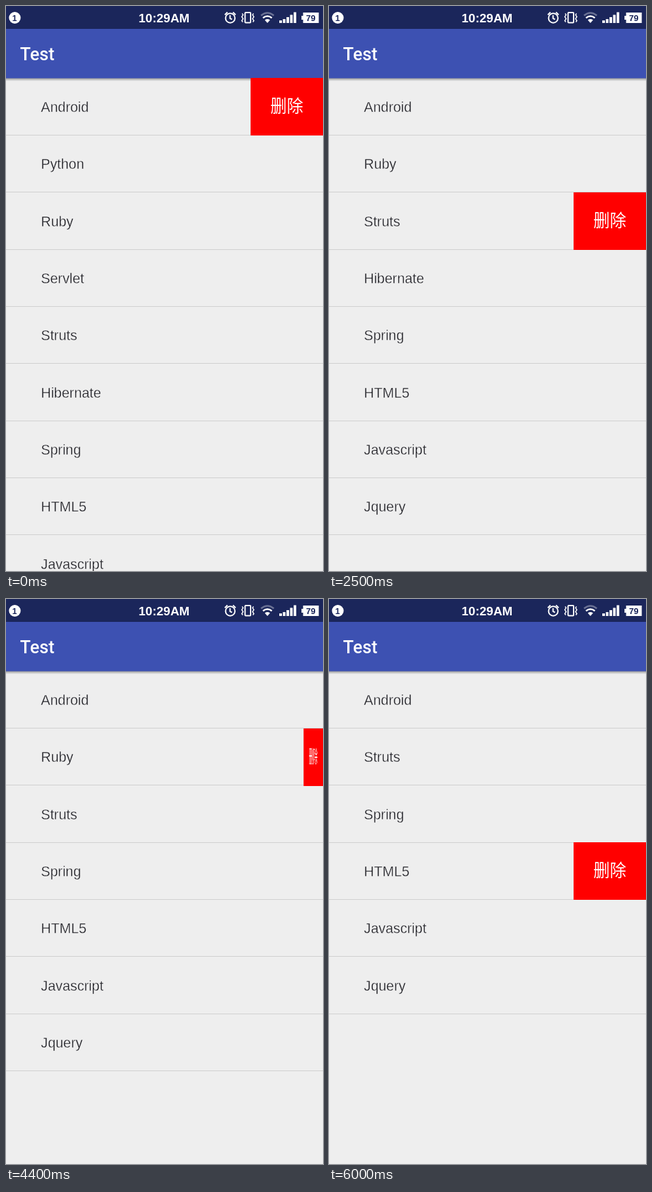
An HTML page that plays this animation: 486 px wide and 864 px high, repeating every 6100 ms.

```html
<!DOCTYPE html>
<html lang="zh-CN">
<head>
<meta charset="utf-8">
<title>Test</title>
<style>
  html, body { margin: 0; width: 100%; height: 100%; overflow: hidden; background: #eee; }
  svg { display: block; width: 486px; height: 864px; }
  .row text { font: 21.3px "Liberation Sans", sans-serif; fill: #1c1c22; stroke: #eee; stroke-width: .4px; }
  .status { font: bold 19px "Liberation Sans", sans-serif; fill: #fff; }
  .small { font: bold 13px "Liberation Sans", sans-serif; fill: #1b265b; text-anchor: middle; }
  .title { font: 500 27px Roboto, sans-serif; fill: #fff; }
  .delete { font: 500 27px "Noto Sans CJK SC", "Noto Sans CJK", sans-serif; fill: #fff; text-anchor: middle; }
  .line { fill: none; stroke: #fff; stroke-width: 2; }
</style>
</head>
<body>
<svg viewBox="0 0 486 864">
  <defs>
    <linearGradient id="shade" x2="0" y2="1">
      <stop stop-color="#000" stop-opacity=".38"/>
      <stop offset="1" stop-color="#000" stop-opacity="0"/>
    </linearGradient>
  </defs>
  <rect width="486" height="864" fill="#eee"/>
  <g id="list"></g>
  <rect y="110" width="486" height="5" fill="url(#shade)"/>
  <rect y="35" width="486" height="75.5" fill="#3d51b2"/>
  <text class="title" x="21.5" y="83">Test</text>

  <rect width="486" height="35" fill="#1b265b"/>
  <circle cx="13.5" cy="18" r="9" fill="#fff"/>
  <text class="small" x="13.2" y="22.7">1</text>
  <text class="status" x="203.3" y="25">10:29AM</text>
  <g class="line">
    <circle cx="343.8" cy="18.5" r="7.2"/>
    <path d="M343.5 14v5l3 1.500M335.500 13.500l4-4M352 13.500l-4-4"/>
    <rect x="366.500" y="10" width="8.500" height="15.500" rx="1"/>
    <path stroke-width="1.500" d="M362 11.500l1.500 2-2 3 2 3-2 3 1.500 2M379.500 11.500l-1.500 2 2 3-2 3 2 3-1.500 2"/>
    <path stroke-width="2.500" stroke-opacity=".35" d="M391 14.500q9.800-8 19.600 0"/>
    <path stroke-width="2.500" d="M394 18.200q6.800-5.400 13.600 0"/>
  </g>
  <path fill="#fff" d="M396.800 21.500q4-2.800 8 0l-4 4.500z"/>
  <path fill="#fff" d="M419 22h4v4h-4zM424.500 20h4v6h-4zM430 17h4v9h-4zM435.500 13.500h4v12.500h-4zM441 9.500h4v16.500h-4z"/>
  <path fill="#fff" d="M453 15h2.500v-5h24v16h-24v-5H453z"/>
  <text class="small" x="467.3" y="22.7">79</text>

  <g id="popup">
    <rect width="119" height="88" fill="#f00"/>
    <text class="delete" x="59.500" y="53.500">删除</text>
  </g>
</svg>
<script>
const LOOP = 6100, STEP = 100, PITCH = 87.33, WIDTH = 119, FADE = 150;
const names = ['Android', 'Python', 'Ruby', 'Servlet', 'Struts', 'Hibernate',
  'Spring', 'HTML5', 'Javascript', 'Jquery'];
const removedAt = { Python: 1300, Servlet: 2500, Hibernate: 3700, Ruby: 4900 };
// row, time the button starts to open, time it starts to close
const popups = [
  [0, -125, 175], [1, 650, 1250], [2, 1850, 2475],
  [3, 3150, 3650], [1, 4350, 4875], [3, 5450, 5975]
];

const list = document.getElementById('list');
const popup = document.getElementById('popup');
const ease = p => (1 - Math.cos(Math.PI * Math.min(1, Math.max(0, p)))) / 2;

function rowMarkup(name, i) {
  const y = i * PITCH;
  return `<g class="row"><text x="53.5" y="${162 + y}">${name}</text>
    <rect y="${Math.round(197 + y)}" width="486" height="1" fill="#cfcfcf"/></g>`;
}

let shown = '';
function draw(t) {
  const rows = names.filter(n => !(t >= removedAt[n])).map(rowMarkup).join('');
  if (rows !== shown) list.innerHTML = shown = rows;

  const open = popups.find(([, from, to]) => t > from && t < to + FADE);
  popup.style.display = open ? '' : 'none';
  if (!open) return;
  const [row, from, to] = open;
  const scale = ease((t - from) / FADE) - ease((t - to) / FADE);
  const y = Math.round(110.3 + row * PITCH);
  popup.setAttribute('transform', `translate(${486 - WIDTH * scale} ${y}) scale(${scale} 1)`);
}

const start = performance.now();
function tick() {
  const t = (performance.now() - start) % LOOP;
  draw(Math.floor(t / STEP) * STEP);
  requestAnimationFrame(tick);
}
tick();
</script>
</body>
</html>
```
